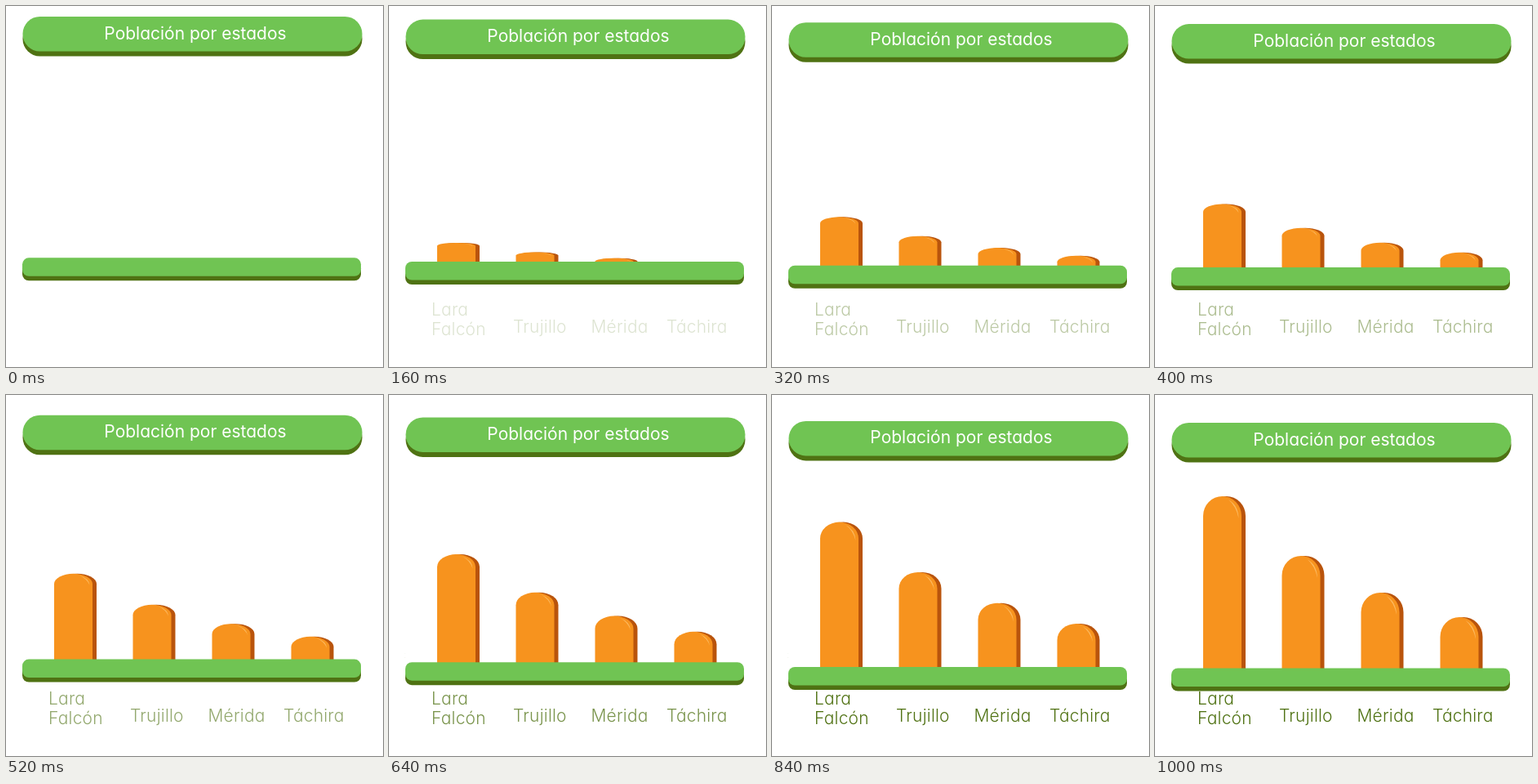
An HTML page for the animation above (3 s loop, 462x442 px).

```html
<!DOCTYPE html>
<html lang="es">
<head>
<meta charset="utf-8">
<title>Población por estados</title>
<style>
  html, body { margin: 0; width: 100%; height: 100%; overflow: hidden; background: #fff; }
  svg { display: block; width: 462px; height: 442px; }
  text { font-family: Inter, "Open Sans", sans-serif; font-size: 21px; font-feature-settings: "cv11"; }
  .green { fill: #70c453; }
  .shade { fill: #4f7213; }
  .front { fill: #f7931e; }
  .side { fill: #b9540c; }
  .shine { fill: #fcb95f; }
  #title text { fill: #fff; text-anchor: middle; }
  #labels { fill: #4f7213; font-weight: 300; letter-spacing: 0.2px; }
</style>
</head>
<body>
<svg viewBox="0 0 462 442">
  <g id="title">
    <rect class="shade" x="20.5" y="6" width="416" height="42.5" rx="21"/>
    <rect class="green" x="20.5" width="416" height="42.5" rx="21"/>
    <text x="232" y="27.5">Población por estados</text>
  </g>
  <g id="bars"></g>
  <g id="base">
    <rect class="shade" x="20" y="5" width="415" height="23" rx="8"/>
    <rect class="green" x="20" width="415" height="22.5" rx="8"/>
  </g>
  <g id="labels">
    <text x="52" y="379">Lara</text>
    <text x="52" y="403">Falcón</text>
    <text x="152" y="399.5">Trujillo</text>
    <text x="247.5" y="399.5">Mérida</text>
    <text x="340" y="399.5">Táchira</text>
  </g>
</svg>
<script>
  const LOOP = 3000, STEP = 40, GROW = 1000, FADE = 850;
  const FLOOR = 321.5, HIDDEN = 22;
  const $ = id => document.getElementById(id);
  const progress = (time, duration) => Math.min(time / duration, 1);

  const addPath = className => {
    const path = document.createElementNS("http://www.w3.org/2000/svg", "path");
    path.setAttribute("class", className);
    $("bars").append(path);
    return path;
  };

  const bars = [[59, 197.5], [155.5, 124.5], [252.5, 79.5], [349.5, 49.5]]
    .map(([x, rise]) => ({
      x, rise,
      side: addPath("side"),
      front: addPath("front"),
      shine: addPath("shine")
    }));

  // Each bar is a round-topped column squashed vertically by `grown`
  function drawBar({ x, rise, side, front, shine }, grown) {
    const top = FLOOR - rise * grown;
    const y = depth => top + depth * grown;
    const bottom = y(rise + HIDDEN);
    const column = left =>
      `M${left} ${bottom}V${y(24)}A23.5 ${24 * grown} 0 0 1 ${left + 47} ${y(24)}V${bottom}Z`;
    side.setAttribute("d", column(x + 5));
    front.setAttribute("d", column(x));
    shine.setAttribute("d",
      `M${x + 31} ${y(4)}Q${x + 43} ${y(11)} ${x + 43.5} ${y(27)}` +
      `Q${x + 40.5} ${y(12)} ${x + 31} ${y(4)}Z`);
  }

  const slide = (id, from, distance, amount) =>
    $(id).setAttribute("transform", `translate(0 ${from + distance * amount})`);

  function draw(elapsed) {
    const time = Math.floor((elapsed % LOOP) / STEP) * STEP;
    slide("title", 13, 21, progress(time, 930));
    slide("base", 308.3, 26.2, progress(time, 890));
    for (const bar of bars) drawBar(bar, progress(time, GROW));
    $("labels").setAttribute("opacity", progress(time, FADE));
  }

  const start = performance.now();
  function tick() {
    draw(performance.now() - start);
    requestAnimationFrame(tick);
  }
  tick();
</script>
</body>
</html>
```
